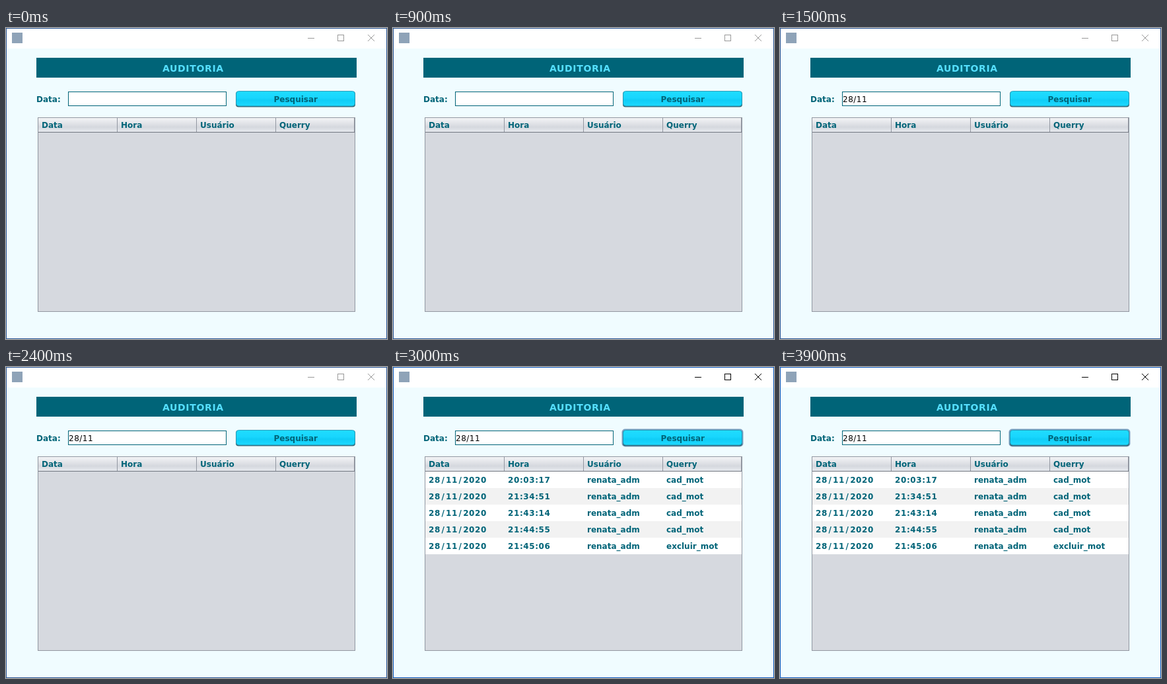
Animation of 577 by 470 pixels, one loop 4500 ms. Source, as an HTML page:

```html
<!DOCTYPE html>
<html lang="pt">
<head>
<meta charset="utf-8">
<style>
  html, body { margin: 0; width: 100%; height: 100%; overflow: hidden; background: #f0fcff; }
  svg { display: block; --edge: #2b5797; --control: #999; }
  svg.active { --edge: #0f5bbf; --control: #000; }
  text { font: bold 12px "DejaVu Sans", Verdana, sans-serif; fill: #006478; }
  .title { font-size: 14px; letter-spacing: .65px; fill: #55dfff; }
  .typed { font-weight: normal; letter-spacing: .5px; fill: #000; }
  .digits { letter-spacing: .6px; }
  .edge { fill: none; stroke: var(--edge); }
  .controls { fill: none; stroke: var(--control); }
</style>
</head>
<body>
<svg width="577" height="470" viewBox="0 0 577 470">
  <defs>
    <linearGradient id="button" x2="0" y2="1">
      <stop stop-color="#20dcff"/>
      <stop offset=".45" stop-color="#18d6fd"/>
      <stop offset=".6" stop-color="#10cdf6"/>
      <stop offset="1" stop-color="#1cd9ff"/>
    </linearGradient>
    <linearGradient id="header" x2="0" y2="1">
      <stop stop-color="#f3f4f6"/>
      <stop offset=".45" stop-color="#dfe1e6"/>
      <stop offset=".65" stop-color="#d5d8de"/>
      <stop offset="1" stop-color="#e6e9ee"/>
    </linearGradient>
  </defs>

  <rect width="577" height="470" fill="#f0fcff"/>
  <rect width="577" height="31" fill="#fff"/>
  <rect x="9" y="7" width="16" height="16" fill="#8fa3b8"/>
  <g class="controls">
    <path d="M457 15.5h10M502.5 10.5h9v9h-9z" shape-rendering="crispEdges"/>
    <path d="M548 10l10 10M558 10l-10 10"/>
  </g>
  <rect class="edge" x=".5" y=".5" width="576" height="469"/>

  <rect x="46" y="45" width="485" height="30" fill="#006478"/>
  <text class="title" x="237" y="66">AUDITORIA</text>

  <text x="46" y="112">Data:</text>
  <rect x="94.5" y="96.5" width="239" height="21" fill="#fff" stroke="#006478"/>
  <text id="typed" class="typed" x="95" y="112">28/11</text>

  <rect id="focus" x="346.5" y="93.5" width="184" height="27" rx="5" fill="#7fa3c4"/>
  <rect x="348" y="96" width="181" height="23.5" rx="4" fill="#35616e"/>
  <rect x="348.5" y="95.5" width="180" height="22.5" rx="4" fill="url(#button)" stroke="#2396b2" stroke-width=".9"/>
  <text x="405.5" y="112">Pesquisar</text>

  <rect x="48.5" y="135.5" width="480" height="293" fill="#d6d9df" stroke="#9297a1"/>
  <rect x="49" y="136" width="479" height="21" fill="url(#header)"/>
  <path d="M49 157.5h479" stroke="#70757f"/>
  <path d="M168.5 136v21m120-21v21m120-21v21m119-21v21" stroke="#9297a1"/>
  <g id="head"></g>
  <g id="rows"></g>
</svg>
<script>
const $ = id => document.getElementById(id);
const svg = document.querySelector('svg');

// Slashes get a little extra room on both sides.
const spaceSlashes = s =>
  s.replace(/\/(\d+)/g, '<tspan dx="1.6">/</tspan><tspan dx="1.6">$1</tspan>');

const cells = (values, y) => values.map((value, i) =>
  `<text x="${54 + 120 * i}" y="${y}"${/^\d/.test(value) ? ' class="digits"' : ''}>${spaceSlashes(value)}</text>`
).join('');

const entries = [
  ['20:03:17', 'cad_mot'],
  ['21:34:51', 'cad_mot'],
  ['21:43:14', 'cad_mot'],
  ['21:44:55', 'cad_mot'],
  ['21:45:06', 'excluir_mot']
];

$('head').innerHTML = cells(['Data', 'Hora', 'Usuário', 'Querry'], 151);
$('rows').innerHTML = entries.map(([time, query], i) =>
  `<rect x="49" y="${158 + 25 * i}" width="479" height="25" fill="${i % 2 ? '#f2f2f2' : '#fff'}"/>` +
  cells(['28/11/2020', time, 'renata_adm', query], 175 + 25 * i)
).join('');

const show = (id, visible) => $(id).setAttribute('visibility', visible ? 'visible' : 'hidden');

function draw() {
  const step = Math.floor(performance.now() % 4500 / 1500);
  const searched = step === 2;
  show('typed', step > 0);
  show('focus', searched);
  show('rows', searched);
  svg.classList.toggle('active', searched);
  requestAnimationFrame(draw);
}
draw();
</script>
</body>
</html>
```
